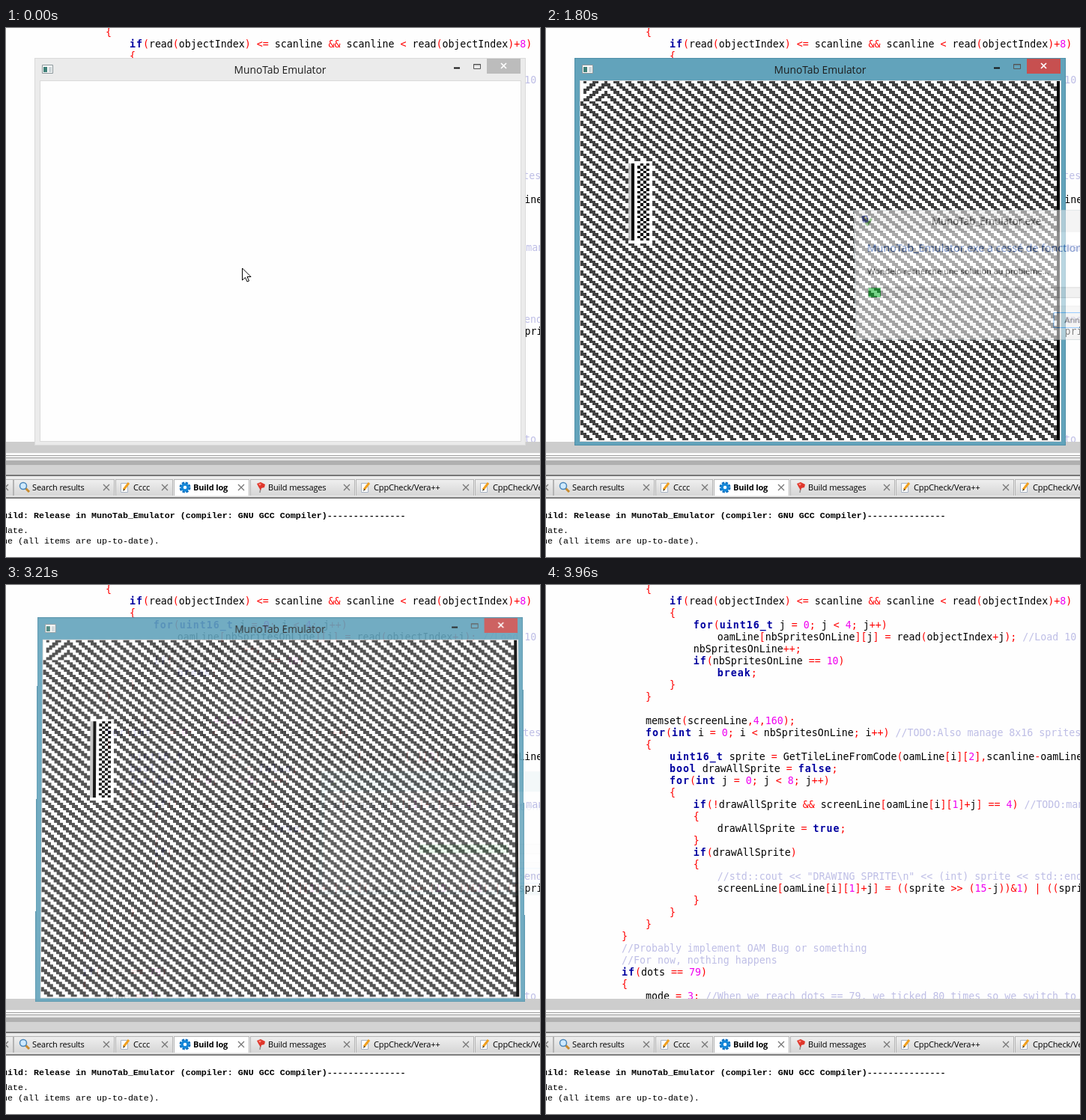
These frames come from a looping animation (713x707 px, 4920 ms). An HTML page with a canvas:

```html
<!DOCTYPE html>
<html lang="en">
<head>
<meta charset="utf-8">
<title>Emulator crash</title>
<style>
html, body { margin: 0; width: 100%; height: 100%; overflow: hidden; background: #fff; }
#stage { position: relative; width: 713px; height: 707px; overflow: hidden; background: #fefefe; color: #000; }
#stage div, #stage span.t, #stage svg, canvas, pre { position: absolute; box-sizing: border-box; }
.t { white-space: pre; font-family: "Open Sans", "Noto Sans", sans-serif; line-height: 20px; }
pre { left: 101px; top: -2px; width: 612px; height: 555px; margin: 0; overflow: hidden;
  font: 13.288px/16px "DejaVu Sans Mono", monospace; }
.comment { color: #bebee6; }
.keyword { color: #0000a0; font-weight: bold; letter-spacing: 1px; }
.number { color: #f000f0; }
.operator { color: #f00; }
#dock { left: 0; top: 553px; width: 713px; height: 154px; background: linear-gradient(
  #cdcdcd 15px, #fafafa 15px 18px, #a0a0a0 18px 19px, #f6f6f6 19px 21px, #a0a0a0 21px 22px, #e6e6e6 22px 25px,
  #b0b0b0 25px 31px, #d3d3d3 31px 44px, #777 44px 46px, #ececec 46px 73px, #d8d8d8 73px 74px, #808080 74px 76px, #fff 76px); }
.tab { top: 50px; height: 22px; border: 1px solid #b4b4b4; border-bottom: 0; background: linear-gradient(#efefef, #d6d6d6); }
.tab.on { background: #fff; font-weight: bold; }
.tab .t { top: 0; font-size: 11px; letter-spacing: -.15px; }
.log { font: 11.667px/14px "Liberation Mono", monospace; left: -5px; }
#main { left: 38px; top: 40px; width: 656px; height: 518px; background: var(--frame); border: 1px solid var(--edge); }
#client { left: 6px; top: 29px; width: 643px; height: 483px; border: 1px solid rgba(0, 0, 0, .14); background: #fefefe; }
canvas { left: 7px; top: 30px; width: 640px; height: 480px; image-rendering: pixelated; }
.title { left: 0; right: 0; text-align: center; line-height: 30px; color: #1c1c1c; }
#main .title { top: 0; font-size: 13.8px; }
#close { left: 603px; top: 0; width: 45px; height: 20px; background: var(--close); }
#dialog { left: 406px; top: 240px; width: 364px; height: 181px; background: var(--frame); border: 1px solid #b8c4c8; }
#dialog .title { font-size: 13.7px; }
#panel { left: 6px; top: 30px; width: 350px; height: 143px; background: #fff; }
#footer { left: 0; top: 102px; width: 350px; height: 41px; background: #f0f0f0; border-top: 1px solid #dfdfdf; }
#track { left: 11px; top: 76px; width: 329px; height: 15px; background: #e6e6e6; border: 1px solid #bcbcbc; overflow: hidden; }
#chunk { top: 0; width: 127px; height: 13px; background: #06b025; }
#cancel { left: 268px; top: 8px; width: 73px; height: 22px; border: 1px solid #3399ff; text-align: center; }
</style>
</head>
<body>
<div id="stage">
  <pre id="code"></pre>
  <div id="dock">
    <span class="t log" style="top:92px;left:-12px;font-weight:bold">Build: Release in MunoTab_Emulator (compiler: GNU GCC Compiler)---------------</span>
    <span class="t log" style="top:112px">date.</span>
    <span class="t log" style="top:126px">ne (all items are up-to-date).</span>
  </div>
  <div id="main">
    <svg width="655" height="30" style="left:-1px;top:-1px" fill="none">
      <path d="M10.5 9.5h14v11h-14z" fill="#f8f8f8" stroke="#8b979b"/>
      <path d="M12 12h5v7h-5z" fill="#3f8078"/><path d="M19 12h4v7h-4z" fill="#ccd5d8"/>
      <path d="M560 13.5h8" stroke="#111" stroke-width="2"/>
      <path d="M586.5 8.5h9v6h-9zM586 9h10" stroke="#555"/>
    </svg>
    <span class="t title">MunoTab Emulator</span>
    <div id="close"><svg width="45" height="20"><path d="M19 6l7 7m0-7l-7 7" stroke="#fff" stroke-width="1.7"/></svg></div>
    <div id="client"></div>
    <canvas id="screen" width="160" height="144"></canvas>
  </div>
  <svg id="cursor" width="14" height="22" style="left:315px;top:320px">
    <path d="M.5 1v16l4-3.5 2.5 5.5 2.5-1-2.5-5.5h5z" fill="#fff" stroke="#000"/>
  </svg>
  <div id="dialog">
    <svg width="18" height="18" style="left:9px;top:6px">
      <path d="M1 2l8-1 2 9-8 1z" fill="#23358f"/><path d="M4 4l3-1 2 5z" fill="#e8d860"/>
      <path d="M5 12l4 4 7-10-3-1-4 6z" fill="#4c9f3c"/>
    </svg>
    <span class="t title">MunoTab_Emulator.exe</span>
    <div id="panel">
      <span class="t" style="left:11px;top:11px;font-size:14.7px;color:#039">MunoTab_Emulator.exe a cessé de fonctionner</span>
      <span class="t" style="left:11px;top:43.5px;font-size:11.3px">Wondelo recherche une solution au problème...</span>
      <div id="track"><div id="chunk"></div></div>
      <div id="footer"><div id="cancel" class="t" style="font-size:11.3px">Annuler</div></div>
    </div>
  </div>
</div>
<script>
const LOOP = 4920, TICK = 77.8;
const $ = id => document.getElementById(id);
const clamp = (v, lo = 0, hi = 1) => Math.min(hi, Math.max(lo, v));
const escape = s => s.replace(/&/g, '&amp;').replace(/</g, '&lt;');

const source = String.raw`    {
        if(read(objectIndex) <= scanline && scanline < read(objectIndex)+8)
        {
            for(uint16_t j = 0; j < 4; j++)
                oamLine[nbSpritesOnLine][j] = read(objectIndex+j); //Load 10 sprites
            nbSpritesOnLine++;
            if(nbSpritesOnLine == 10)
                break;
        }
    }

    memset(screenLine,4,160);
    for(int i = 0; i < nbSpritesOnLine; i++) //TODO:Also manage 8x16 sprites
    {
        uint16_t sprite = GetTileLineFromCode(oamLine[i][2],scanline-oamLine[i][0]);
        bool drawAllSprite = false;
        for(int j = 0; j < 8; j++)
        {
            if(!drawAllSprite && screenLine[oamLine[i][1]+j] == 4) //TODO:manage
            {
                drawAllSprite = true;
            }
            if(drawAllSprite)
            {
                //std::cout << "DRAWING SPRITE\n" << (int) sprite << std::endl;
                screenLine[oamLine[i][1]+j] = ((sprite >> (15-j))&1) | ((sprite
            }
        }
    }
}
//Probably implement OAM Bug or something
//For now, nothing happens
if(dots == 79)
{
    mode = 3; //When we reach dots == 79, we ticked 80 times so we switch to`;

const kinds = ['comment', 'keyword', 'number', 'operator'];
const token = /(\/\/.*)|\b(if|for|break|uint16_t|int|bool|true|false)\b|\b(\d+)\b|([^\w\s])|\w+/g;
$('code').innerHTML = source.replace(token, (text, ...groups) => {
  const kind = kinds[groups.slice(0, 4).findIndex(Boolean)];
  return kind ? `<span class="${kind}">${escape(text)}</span>` : text;
});

const icons = {
  none: '',
  search: '<path d="M9 9l5 5" stroke="#c98a2b" stroke-width="3"/><circle cx="6" cy="6" r="4.5" fill="#cfeaff" stroke="#4a86b8" stroke-width="1.5"/>',
  pencil: '<path d="M1.5 2.5h9v12h-9z" fill="#fff" stroke="#a9b4c4"/><path d="M5 11l7-9" stroke="#f0a020" stroke-width="3"/><path d="M4 13l1-3 2 1z" fill="#333"/>',
  gear: '<circle cx="8" cy="8" r="6" fill="none" stroke="#0b6fc0" stroke-width="3" stroke-dasharray="3.2 1.5"/><circle cx="8" cy="8" r="4" fill="none" stroke="#1587d8" stroke-width="3.5"/>',
  pin: '<path d="M7 9l-1 6" stroke="#888" stroke-width="1.5"/><path d="M2 3l5-2 6 3-1 4-4 1-1 3-3-5z" fill="#e0372c"/><path d="M4 3l4 0-2 3z" fill="#ff8d80"/>'
};
// left, right, icon, label, icon x, label x
const tabs = [
  [-60, 10, 'none', '', 0, 0],
  [10, 145, 'search', 'Search results', 17, 35],
  [146, 223, 'pencil', 'Cccc', 152, 170],
  [224, 325, 'gear', 'Build log', 231, 250],
  [326, 466, 'pin', 'Build messages', 333, 350],
  [467, 625, 'pencil', 'CppCheck/Vera++', 473, 491],
  [626, 790, 'pencil', 'CppCheck/Vera++ messages', 632, 650]
];
for (const [left, right, icon, label, iconX, labelX] of tabs) {
  const inner = x => x - left - 1;
  $('dock').insertAdjacentHTML('beforeend', `<div class="tab${icon === 'gear' ? ' on' : ''}" style="left:${left}px;width:${right - left}px">
    <svg width="16" height="16" style="left:${inner(iconX)}px;top:2px">${icons[icon]}</svg>
    <span class="t" style="left:${inner(labelX)}px">${label}</span>
    <svg width="10" height="10" style="right:5px;top:5px"><path d="M1 1l8 8m0-8l-8 8" stroke="#777" stroke-width="1.3"/></svg></div>`);
}

const ctx = $('screen').getContext('2d');
const rect = (color, x, y, w = 1, h = 1) => { ctx.fillStyle = color; ctx.fillRect(x, y, w, h); };
let drawnStep;

function drawScreen(step) {
  if (step === drawnStep) return;
  drawnStep = step;
  rect('#fff', 0, 0, 160, 144);
  for (let y = 0; y < 144; y++)
    for (let x = 0; x < 160; x++) {
      const mirrored = x < 8 && y < 8;
      if (((mirrored ? x + y : x - y + 1) & 3) < 2) rect('#404040', x, y);
    }
  rect('#fff', 0, 0, 1, 6);
  rect('#000', 159, 0, 1, 144);

  const top = step * 8;
  rect('#fff', 16, top, 8, 33);
  rect('#c0c0c0', 16, top + 1, 1, 31);
  rect('#000', 17, top + 1, 1, 31);
  for (let y = top + 1; y < top + 32; y++)
    for (let x = 19; x < 23; x++) if (x + y & 1) rect('#000', x, y);

  if (step === 0) {
    rect('#b0b0b0', 130, 129, 6, 6);
    rect('#000', 128, 130, 2, 4);
    rect('#000', 131, 128, 4, 1);
    rect('#000', 131, 135, 4, 1);
    rect('#000', 130, 129);
    rect('#000', 130, 134);
    rect('#fff', 130, 131, 2, 2);
    rect('#000', 131, 133, 2, 1);
  }
}

// amount 0 is at rest, 1 is fully receded and invisible
function recede(el, amount, side) {
  el.style.opacity = 1 - amount;
  el.style.transform = amount ? `perspective(1000px) translateZ(${-74 * amount}px) rotateX(${side * 11.6 * amount}deg)` : 'none';
}

function setFrame(el, frame, edge, close) {
  el.style.setProperty('--frame', frame);
  el.style.setProperty('--edge', edge);
  el.style.setProperty('--close', close);
}

function render(t) {
  const q = t < 1800 ? t : 1800 + Math.floor((t - 1800) / TICK + .03) * TICK;

  if (t < 170) setFrame($('main'), '#ebebeb', '#dadada', '#bcbcbc');
  else if (t < 240) setFrame($('main'), '#a7c7d3', '#95b4c0', '#c28686');
  else setFrame($('main'), '#62a3bb', '#4f8fa8', '#c75050');
  recede($('main'), clamp((q - 3126) / 234) ** 2, 1);

  $('screen').style.visibility = t < 930 ? 'hidden' : 'inherit';
  drawScreen(clamp(Math.floor((t - 920) / 80), 0, 4));
  $('cursor').style.display = t < 1080 ? '' : 'none';

  const dialog = $('dialog');
  dialog.style.display = t < 1800 || t >= 3270 ? 'none' : '';
  setFrame(dialog, q < 2870 ? '#ebebeb' : '#62a3bb');
  if (q < 2870) recede(dialog, .45 * clamp(1 - (q - 1800) / 400) ** 2, -1);
  else recede(dialog, clamp((q - 2970) / 240) ** 2, 1);
  $('chunk').style.left = 16 + (Math.min(q, 2970) - 2430) * .2 + 'px';
  $('cancel').style.background = q < 2800 ? '#ececec' : '#e5f1fb';
}

let start;
function loop(now) {
  start ??= now;
  render((now - start) % LOOP);
  requestAnimationFrame(loop);
}
render(0);
requestAnimationFrame(loop);
</script>
</body>
</html>
```
